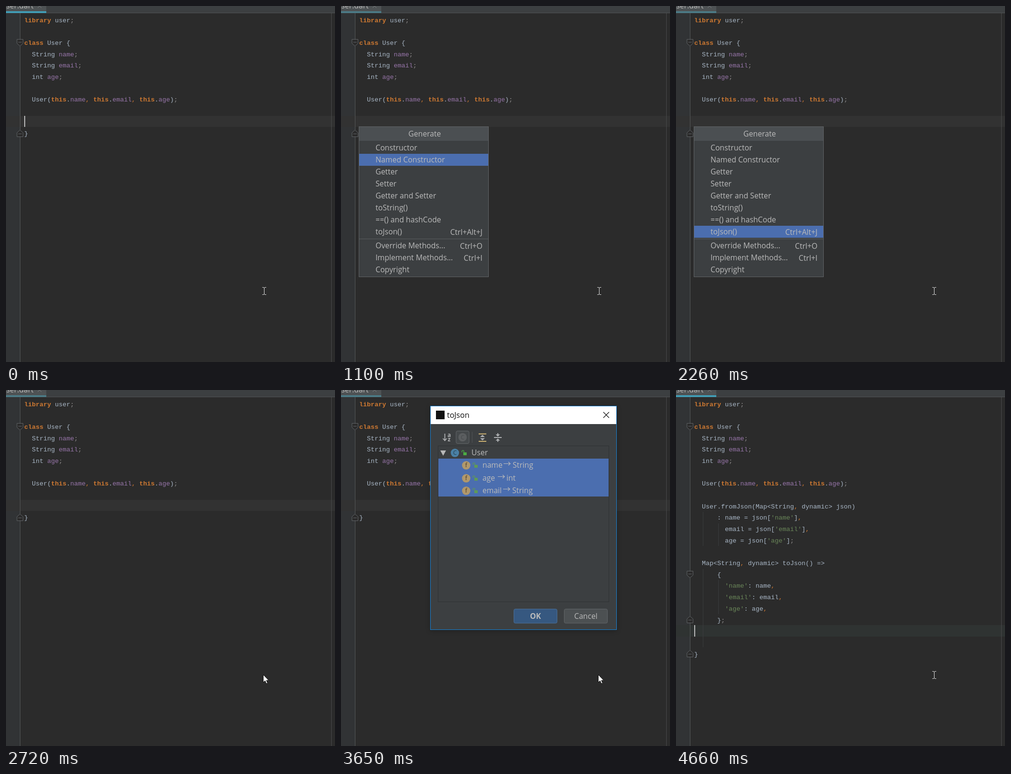
An HTML page that plays this animation: 686 px wide and 742 px high, repeating every 4.89 s.

```html
<!DOCTYPE html>
<html lang="en">
<head>
<meta charset="utf-8">
<title>Code generation menu</title>
<style>
  html, body { margin: 0; width: 100%; height: 100%; overflow: hidden; background: #2b2b2b; }
  svg { display: block; }
  text { white-space: pre; fill: #bbb; font: 15.7px "Open Sans", "Noto Sans", sans-serif; }
  .code text { fill: #a9b7c6; font: 13.33px "Liberation Mono", "DejaVu Sans Mono", monospace; }
  .code .key { fill: #cc7832; font-weight: bold; }
  .code .str { fill: #6a8759; }
  .code .field { fill: #9876aa; }
  .code .comma { fill: #cc7832; }
  .code .semi { fill: #8f8c8c; }
  .fold path { fill: #2b2b2b; stroke: #606366; }
</style>
</head>
<body>
<svg id="stage" width="686" height="742" viewBox="0 0 686 742"></svg>
<script>
const LOOP = 4890, PITCH = 23.68;
const stage = document.getElementById('stage');

function add(parent, tag, attrs = {}, text) {
  const el = document.createElementNS('http://www.w3.org/2000/svg', tag);
  for (const k in attrs) el.setAttribute(k, attrs[k]);
  if (text !== undefined) el.textContent = text;
  parent.appendChild(el);
  return el;
}
const group = (parent, attrs) => add(parent, 'g', attrs);
const rect = (parent, x, y, width, height, fill, more) =>
  add(parent, 'rect', { x, y, width, height, fill, ...more });
const path = (parent, d, stroke, more) =>
  add(parent, 'path', { d, stroke, fill: 'none', ...more });
const label = (parent, x, y, text, more) => add(parent, 'text', { x, y, ...more }, text);
const show = (el, on) => { el.style.display = on ? '' : 'none'; };

// Editor

rect(stage, 0, 0, 686, 742, '#2b2b2b');
rect(stage, 0, 14, 29, 728, '#313335');
const current = rect(stage, 0, 229, 686, 23, '#323232');
path(stage, 'M29.5 15V742', '#555758');
path(stage, 'M678.5 15V742', '#48494a');

rect(stage, 0, 0, 686, 14, '#3c3f41');
rect(stage, 0, 0, 84, 12, '#4e5254');
label(stage, 0.5, 5, 'ser.dart');
path(stage, 'M66 -4L74 4M74 -4L66 4', '#7b7e80');
path(stage, 'M0 14.5H686', '#505355');
const underline = rect(stage, 0, 11, 84, 3.5, '#3fa2bd');

const KINDS = [
  [/^(library|class|this)$/, 'key'], [/^'/, 'str'], [/^,$/, 'comma'], [/^;$/, 'semi']
];
function line(parent, row, col, code, fields) {
  const el = add(parent, 'text', { x: 38 + 8 * col, y: 33.6 + PITCH * row });
  for (const part of code.split(/(\b(?:library|class|this|name|email|age)\b|'[^']*'|[,;])/)) {
    if (!part) continue;
    const kind = KINDS.find(k => k[0].test(part));
    const isField = fields && /^(name|email|age)$/.test(part);
    add(el, 'tspan', { class: kind ? kind[1] : isField ? 'field' : '' }, part);
  }
}
function fold(parent, row, end) {
  const g = group(parent, { class: 'fold', transform: `translate(29.2 ${Math.round(29 + PITCH * row)})` });
  path(g, end ? 'M0 -7.5L6.3 -2V6.5H-6.3V-2Z' : 'M0 7.5L6.3 2V-6.5H-6.3V2Z');
  path(g, end ? 'M-3.5 .5H3.5' : 'M-3.5 -.5H3.5');
}

const base = group(stage, { class: 'code' });
line(base, 0, 0, 'library user;');
line(base, 2, 0, 'class User {');
line(base, 3, 2, 'String name;', true);
line(base, 4, 2, 'String email;', true);
line(base, 5, 2, 'int age;', true);
line(base, 7, 2, 'User(this.name, this.email, this.age);', true);
fold(base, 2);

const before = group(stage, { class: 'code' });
line(before, 10, 0, '}');
fold(before, 10, true);

const after = group(stage, { class: 'code' });
path(after, 'M56.5 254V325M56.5 373V536M88.5 278V325M88.5 396V467', '#3a3c3d');
line(after, 9, 2, 'User.fromJson(Map<String, dynamic> json)');
line(after, 10, 6, ": name = json['name'],");
line(after, 11, 8, "email = json['email'],");
line(after, 12, 8, "age = json['age'];");
line(after, 14, 2, 'Map<String, dynamic> toJson() =>');
line(after, 15, 6, '{');
line(after, 16, 8, "'name': name,");
line(after, 17, 8, "'email': email,");
line(after, 18, 8, "'age': age,");
line(after, 19, 6, '};');
line(after, 22, 0, '}');
fold(after, 22, true);

const newFolds = group(stage);
fold(newFolds, 15);
fold(newFolds, 19, true);

const caret = rect(stage, 38, 229, 2, 23, '#bbb');

// Popup menu

const menu = group(stage);
rect(menu, 37.5, 251.5, 270, 313, '#3c3f41', { stroke: '#616466' });
rect(menu, 38, 252, 269, 29, '#4b4f52');
label(menu, 174.5, 272, 'Generate', { 'text-anchor': 'middle' });
const menuBar = rect(menu, 38, 283, 269, 25, '#4b6eaf');
['Constructor', 'Named Constructor', 'Getter', 'Setter', 'Getter and Setter',
  'toString()', '==() and hashCode', 'toJson()'
].forEach((s, i) => label(menu, 72, 301 + 25 * i, s));
path(menu, 'M38 485.5H307', '#595c5e');
['Override Methods...', 'Implement Methods...', 'Copyright'
].forEach((s, i) => label(menu, 72, 505 + 25 * i, s));
[['Ctrl+Alt+J', 477], ['Ctrl+O', 506], ['Ctrl+I', 531]
].forEach(([s, y]) => label(menu, 295, y, s, { 'text-anchor': 'end' }));

// Dialog

const dialog = group(stage);
dialog.style.filter = 'drop-shadow(0 2px 4px rgba(0,0,0,.25))';
const frame = rect(dialog, 186.5, 33.5, 388, 466, '#3c3f41');
rect(dialog, 187, 34, 387, 37, '#fff');
rect(dialog, 198, 43, 18, 18, '#111');
const title = label(dialog, 221, 58, 'toJson', { style: 'font-size:16px' });
const cross = path(dialog, 'M547 46L559 58M559 46L547 58', '#111', { 'stroke-width': 1.2 });

const GREY = '#afb1b3';
path(dialog, 'M216.5 91V105M212.5 101L216.5 105.5L220.5 101', GREY, { 'stroke-width': 1.8 });
label(dialog, 222, 98, 'a', { style: `font-size:12px;font-weight:bold;fill:${GREY}` });
label(dialog, 222.5, 107, 'z', { style: `font-size:12px;font-weight:bold;fill:${GREY}` });
rect(dialog, 240, 85.5, 27, 26, '#45494b', { rx: 3, stroke: '#63676a' });
badge(253.5, 98.5, 'C', '#5b5e60', '#484b4d');
path(dialog, 'M273.5 87V110', '#515456');
path(dialog, 'M287 91.5H303M287 107H303', '#cdb272', { 'stroke-width': 2 });
path(dialog, 'M295 93.5L300 98H290ZM295 105L300 100.5H290Z', 'none', { fill: GREY });
path(dialog, 'M319 99H335', GREY, { 'stroke-width': 2 });
path(dialog, 'M327 97L331.5 92.5H322.5ZM327 101L331.5 105.5H322.5Z', 'none', { fill: GREY });
path(dialog, 'M327 90V94M327 104V108', GREY, { 'stroke-width': 2 });

rect(dialog, 202.5, 116.5, 356, 325, 'none', { stroke: '#2f3234' });
path(dialog, 'M207 126H219L213 137Z', 'none', { fill: '#b8b8b8' });

function badge(x, y, letter, fill, ink) {
  const disc = add(dialog, 'circle', { cx: x, cy: y, r: 8.7, fill });
  label(dialog, x, y + 4.3, letter, { 'text-anchor': 'middle', style: `font-size:12px;fill:${ink}` });
  return disc;
}
function lock(x, y) {
  const g = group(dialog, { transform: `translate(${x} ${y})`, color: '#4bab43' });
  rect(g, 4, 0, 7, 6, 'currentColor');
  path(g, 'M1.2 0V-2.2A2 2 0 0 1 5.2 -2.2V0', 'currentColor', { 'stroke-width': 1.3 });
  return g;
}
badge(237.5, 131, 'C', '#4a80a5', '#26404f');
lock(251, 130);
label(dialog, 272, 136, 'User');

const rows = [
  ['name', 'String', 339, 358, 143, 27],
  ['age', 'int', 327, 345, 170, 26],
  ['email', 'String', 338, 357, 196, 26]
].map(([name, type, arrowX, typeX, y, h]) => {
  const bar = rect(dialog, 203, y, 355, h, '#4b6eaf');
  const mid = y + 14;
  const disc = badge(261, mid, 'f', '#b57e40', '#4a3720');
  const pad = lock(274, mid - 1);
  label(dialog, 295, mid + 5, name);
  path(dialog, `M${arrowX} ${mid - 3.5}h14m-4 -3.5l4 3.5l-4 3.5`, '#bbb', { 'stroke-width': 1.1 });
  label(dialog, typeX, mid + 5, type);
  return { bar, disc, pad };
});

function button(x, text, fill, stroke, weight) {
  rect(dialog, x, 456.5, 90, 29.5, fill, { rx: 3, stroke });
  label(dialog, x + 45, 477, text, { 'text-anchor': 'middle', style: `font-weight:${weight}` });
}
button(360.5, 'OK', '#365880', '#4c7096', 700);
button(465.5, 'Cancel', '#4c5052', '#616568', 400);

// Pointers

const beam = path(stage,
  'M534.5 586.5H537L538.5 587.5L540 586.5H542.5M534.5 601.5H537L538.5 600.5L540 601.5H542.5M538.5 587V601',
  '#e4e4e4');
const arrow = path(stage, 'M536.5 593.5V609.5L540.2 606L542.8 612L545.4 610.8L542.9 605.2H547.8Z',
  '#111', { fill: '#fff' });

// Each step changes only the values it lists.
const START = {
  focus: true, menu: -1, win: 0, scale: 1, active: true,
  picked: 1, arrow: false, done: false, folds: false
};
const STEPS = [
  [320, { focus: false, menu: 0 }],
  [1100, { menu: 1 }],
  [1480, { menu: 2 }],
  [1630, { menu: 3 }],
  [1710, { menu: 4 }],
  [1860, { menu: 5 }],
  [2030, { menu: 6 }],
  [2260, { menu: 7 }],
  [2720, { menu: -1, arrow: true }],
  [2810, { win: 0.3, scale: 0.93 }],
  [2890, { win: 0.7, scale: 0.97 }],
  [2970, { win: 0.92, scale: 0.993 }],
  [3040, { win: 1, scale: 1 }],
  [3500, { picked: 2 }],
  [3650, { picked: 3 }],
  [4360, { active: false, arrow: false }],
  [4430, { win: 0.4, scale: 0.95 }],
  [4510, { win: 0, focus: true, done: true }],
  [4660, { folds: true }]
];

function draw(t) {
  const s = { ...START };
  for (const [at, change] of STEPS) if (t >= at) Object.assign(s, change);

  underline.setAttribute('fill', s.focus ? '#3fa2bd' : '#4a7d89');
  const y = s.done ? 490 : 229;
  current.setAttribute('y', y);
  current.setAttribute('height', s.done ? 24 : 23);
  current.setAttribute('fill', s.done ? '#2f3332' : '#323232');
  caret.setAttribute('y', y);
  caret.setAttribute('height', s.done ? 24 : 23);
  show(caret, s.focus);
  show(before, !s.done);
  show(after, s.done);
  show(newFolds, s.folds);

  show(menu, s.menu >= 0);
  menuBar.setAttribute('y', 283 + 25 * Math.max(0, s.menu));

  show(dialog, s.win > 0);
  dialog.setAttribute('opacity', s.win);
  dialog.setAttribute('transform', `translate(380.5 266.5) scale(${s.scale}) translate(-380.5 -266.5)`);
  frame.setAttribute('stroke', s.active ? '#1883d7' : '#4b4e50');
  title.style.fill = s.active ? '#111' : '#999';
  show(cross, s.active);
  rows.forEach((row, i) => {
    const on = i < s.picked;
    show(row.bar, on);
    row.disc.setAttribute('fill', on ? '#b0986c' : '#b57e40');
    row.pad.setAttribute('color', on ? '#5f9a58' : '#4bab43');
  });

  show(beam, !s.arrow);
  show(arrow, s.arrow);
}

const begin = performance.now();
function tick() {
  draw((performance.now() - begin) % LOOP);
  requestAnimationFrame(tick);
}
tick();
</script>
</body>
</html>
```
